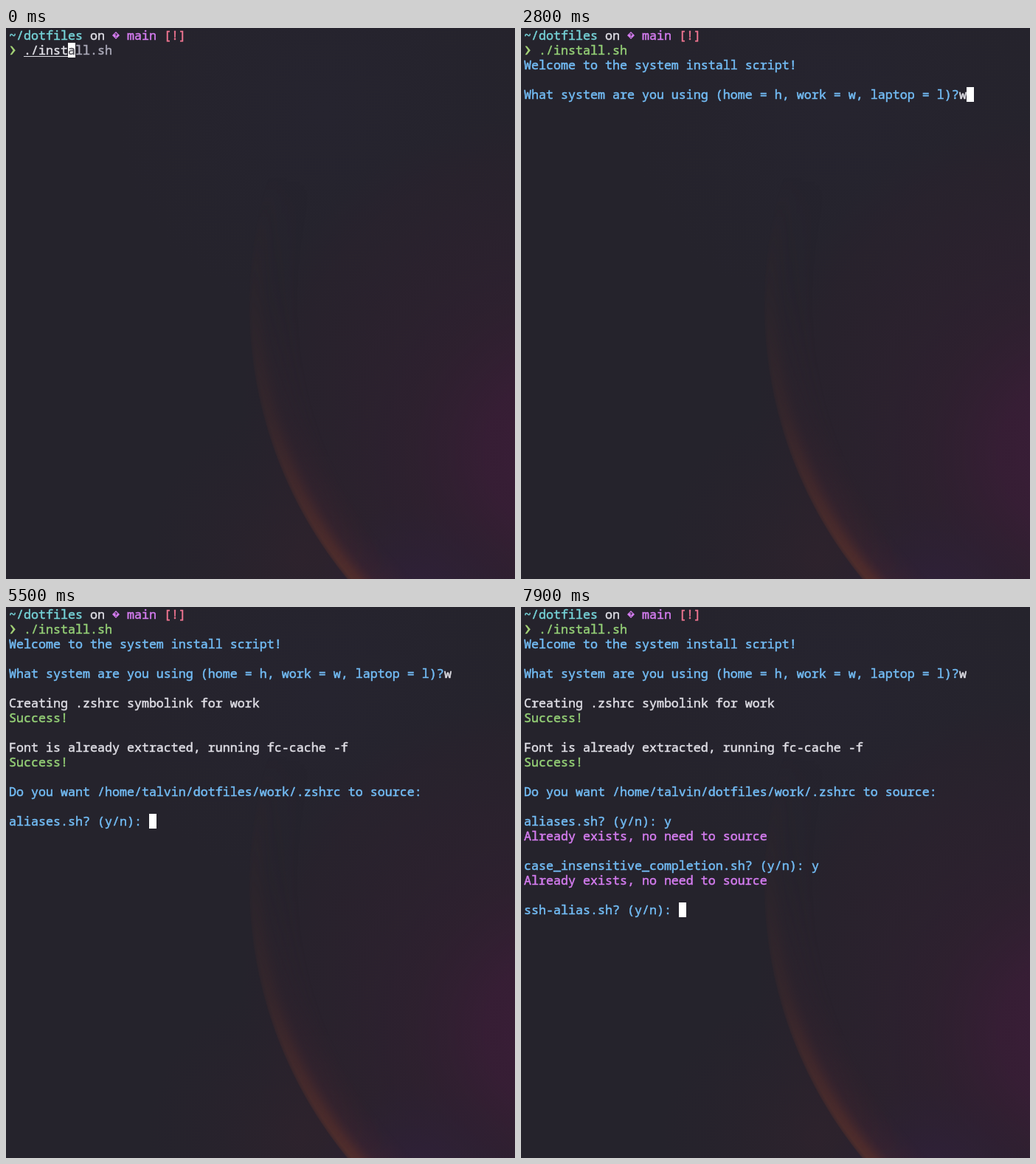
Animation, 690 px wide and 746 px high, one loop 8 s. Source, as an HTML page:

```html
<!DOCTYPE html>
<html lang="en">
<head>
<meta charset="utf-8">
<title>Install script</title>
<style>
  html, body { margin: 0; width: 100%; height: 100%; overflow: hidden; background: #25232c; }
  #wall { position: absolute; left: 0; top: 0; width: 690px; height: 746px; }
  #term { position: absolute; left: 4px; top: 0; }
  #term, #cursor {
    font: 16.667px/20px "Noto Sans Mono", "DejaVu Sans Mono", monospace;
    font-variant-ligatures: none;
    -webkit-text-stroke: .5px currentColor;
    white-space: pre;
    color: #dfdee5;
  }
  .row { position: absolute; left: 0; height: 20px; }
  .icon { display: inline-block; width: 10px; height: 20px; vertical-align: top; overflow: visible; }
  .cyan { color: #76d3d8; }
  .blue { color: #73bdf6; }
  .green { color: #94cf76; }
  .purple { color: #d47cef; }
  .red { color: #ee7490; }
  .hint { color: #aaa9b8; }
  .path { text-decoration: underline; text-decoration-thickness: 1px; text-underline-offset: 2px; }
  #cursor { position: absolute; left: 0; top: 0; width: 10px; height: 20px; background: #fff; color: #55535c; }
</style>
</head>
<body>
<svg id="wall" viewBox="0 0 690 746" aria-hidden="true">
  <defs>
    <radialGradient id="plum" gradientUnits="userSpaceOnUse" cx="760" cy="575" r="320">
      <stop offset="0" stop-color="#3b1d38"/>
      <stop offset=".35" stop-color="#391d36" stop-opacity=".8"/>
      <stop offset=".65" stop-color="#331e31" stop-opacity=".36"/>
      <stop offset="1" stop-color="#2c2030" stop-opacity="0"/>
    </radialGradient>
    <radialGradient id="halo" gradientUnits="userSpaceOnUse" cx="720" cy="520" r="400">
      <stop offset=".6" stop-color="#30202f" stop-opacity=".5"/>
      <stop offset=".85" stop-color="#2e202d" stop-opacity=".3"/>
      <stop offset="1" stop-color="#2c202c" stop-opacity="0"/>
    </radialGradient>
    <radialGradient id="dusk" gradientUnits="userSpaceOnUse" cx="560" cy="790" r="150">
      <stop offset="0" stop-color="#33203f" stop-opacity=".9"/>
      <stop offset="1" stop-color="#2c2036" stop-opacity="0"/>
    </radialGradient>
    <radialGradient id="ember" gradientUnits="userSpaceOnUse" cx="400" cy="720" r="210">
      <stop offset="0" stop-color="#32222d" stop-opacity=".6"/>
      <stop offset="1" stop-color="#2b212c" stop-opacity="0"/>
    </radialGradient>
    <radialGradient id="haze" gradientUnits="userSpaceOnUse" cx="430" cy="110" r="280">
      <stop offset="0" stop-color="#26242f"/>
      <stop offset="1" stop-color="#26242f" stop-opacity="0"/>
    </radialGradient>
    <radialGradient id="rim" gradientUnits="userSpaceOnUse" cx="914" cy="375" r="588">
      <stop offset=".88" stop-color="#42242f" stop-opacity="0"/>
      <stop offset=".945" stop-color="#452530" stop-opacity=".4"/>
      <stop offset=".972" stop-color="#552d2b" stop-opacity=".8"/>
      <stop offset=".985" stop-color="#552f2b" stop-opacity=".9"/>
      <stop offset=".992" stop-color="#4a2c2c" stop-opacity=".75"/>
      <stop offset=".995" stop-color="#3a2729" stop-opacity="0"/>
    </radialGradient>
    <linearGradient id="rise" gradientUnits="userSpaceOnUse" x1="0" y1="200" x2="0" y2="746">
      <stop offset="0" stop-color="#fff" stop-opacity="0"/>
      <stop offset=".3" stop-color="#fff" stop-opacity=".12"/>
      <stop offset=".6" stop-color="#fff" stop-opacity=".34"/>
      <stop offset="1" stop-color="#fff"/>
    </linearGradient>
    <mask id="fade" maskUnits="userSpaceOnUse" x="0" y="0" width="690" height="746" style="mask-type: alpha">
      <rect width="690" height="746" fill="url(#rise)"/>
    </mask>
  </defs>
  <rect width="690" height="746" fill="#25232c"/>
  <rect width="690" height="746" fill="url(#haze)"/>
  <rect width="690" height="746" fill="url(#halo)"/>
  <rect width="690" height="746" fill="url(#plum)"/>
  <rect width="690" height="746" fill="url(#ember)"/>
  <rect width="690" height="746" fill="url(#dusk)"/>
  <circle cx="914" cy="375" r="588" fill="url(#rim)" mask="url(#fade)"/>
</svg>

<div id="term">
  <div class="row" data-row="0"><span class="cyan">~/dotfiles</span> on <svg class="icon" viewBox="0 0 10 20"><path d="M5 5 10 10 5 15 0 10Z" fill="#d47cef"/><path d="M3.6 8.6Q5 7 6.3 8.5 6.4 9.5 5 10.3V11M5 12V13" fill="none" stroke="#25232c" stroke-width="1.1"/></svg> <span class="purple">main</span> <span class="red">[!]</span></div>
  <div class="row" data-row="1"><svg class="icon" viewBox="0 0 10 20"><path d="M1.5 4.5 4 4.5 8.8 10.3 4 16.2 1.5 16.2 5.5 10.3Z" fill="#a2cf75"/></svg> <span id="typed"></span><span id="hint" class="hint"></span></div>
  <div class="row blue" data-row="2" data-at="1000">Welcome to the system install script!</div>
  <div class="row blue" data-row="4" data-at="1000">What system are you using (home = h, work = w, laptop = l)?</div>
  <div class="row" data-row="4" data-col="59" data-at="2300">w</div>
  <div class="row" data-row="6" data-at="3400">Creating .zshrc symbolink for work</div>
  <div class="row green" data-row="7" data-at="3400">Success!</div>
  <div class="row" data-row="9" data-at="3400">Font is already extracted, running fc-cache -f</div>
  <div class="row green" data-row="10" data-at="5000">Success!</div>
  <div class="row blue" data-row="12" data-at="5000">Do you want /home/talvin/dotfiles/work/.zshrc to source:</div>
  <div class="row blue" data-row="14" data-at="5000">aliases.sh? (y/n): </div>
  <div class="row blue" data-row="14" data-col="19" data-at="5800">y</div>
  <div class="row purple" data-row="15" data-at="6100">Already exists, no need to source</div>
  <div class="row blue" data-row="17" data-at="6100">case_insensitive_completion.sh? (y/n): </div>
  <div class="row blue" data-row="17" data-col="39" data-at="6900">y</div>
  <div class="row purple" data-row="18" data-at="7300">Already exists, no need to source</div>
  <div class="row blue" data-row="20" data-at="7300">ssh-alias.sh? (y/n): </div>
</div>
<div id="cursor"></div>

<script>
  const LOOP = 8000, CELL = 10, LINE = 20, LEFT = 4;
  const COMMAND = "./install.sh", KEY_TIME = 120;

  // Cursor stops after the command: time, column, row
  const stops = [
    [1000, 59, 4], [2300, 60, 4], [3400, 0, 10], [5000, 19, 14],
    [5800, 20, 14], [6100, 39, 17], [6900, 40, 17], [7300, 21, 20]
  ];

  const byId = id => document.getElementById(id);
  const typed = byId("typed"), hint = byId("hint"), cursor = byId("cursor");
  const rows = [...document.querySelectorAll(".row")];

  for (const row of rows) {
    row.style.top = row.dataset.row * LINE + "px";
    row.style.left = (row.dataset.col || 0) * CELL + "px";
  }

  function render(t) {
    for (const row of rows) {
      row.style.visibility = t >= (row.dataset.at || 0) ? "visible" : "hidden";
    }

    const count = Math.min(COMMAND.length, 6 + Math.floor(t / KEY_TIME));
    typed.textContent = COMMAND.slice(0, count);
    typed.className = count < COMMAND.length ? "path" : "green";
    hint.textContent = COMMAND.slice(count);

    const stop = stops.filter(s => s[0] <= t).pop();
    const [, col, line] = stop || [0, 2 + count, 1];
    cursor.textContent = stop ? "" : COMMAND[count] || "";
    cursor.style.transform = `translate(${LEFT + col * CELL}px, ${line * LINE}px)`;
  }

  const start = performance.now();
  function tick() {
    render((performance.now() - start) % LOOP);
    requestAnimationFrame(tick);
  }
  tick();
</script>
</body>
</html>
```
